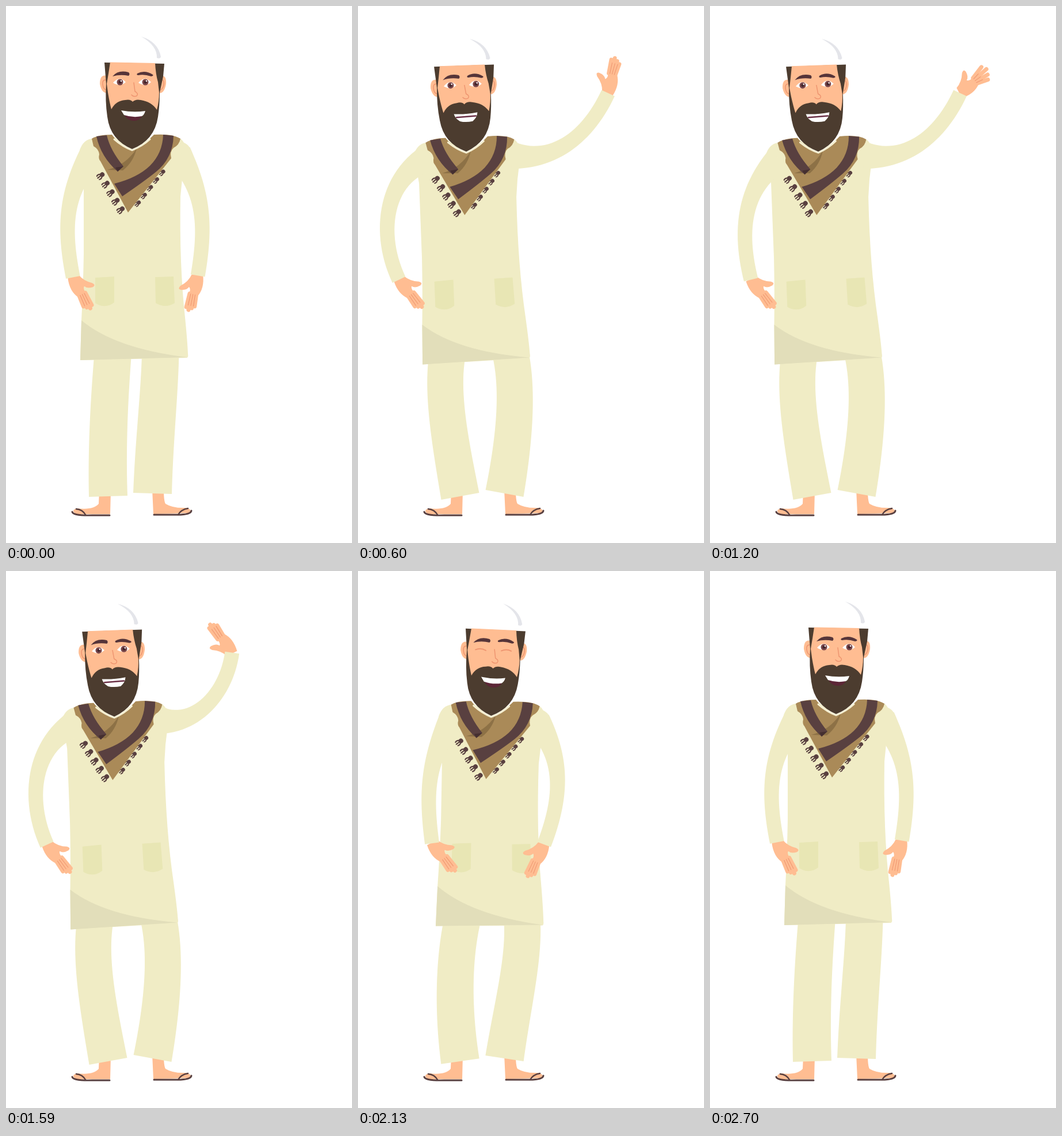
An HTML page with a canvas for the animation above (3000 ms loop, 601 by 931 pixels).

```html
<!DOCTYPE html>
<html lang="en">
<head>
<meta charset="utf-8">
<title>Waving man</title>
<style>
html, body { margin: 0; width: 100%; height: 100%; overflow: hidden; background: #fff; }
canvas { display: block; }
</style>
</head>
<body>
<canvas id="stage" width="601" height="931"></canvas>
<script>
const ctx = document.getElementById('stage').getContext('2d');
const CLOTH = '#f0ecc5', SKIN = '#ffbd92', CREASE = '#ee9570', HAIR = '#4c3c2f',
      BROWN = '#aa8a58', DARK = '#594040', BROW = '#563539';
ctx.lineCap = 'round';

const rad = deg => deg * Math.PI / 180;
const ease = (t, from, to) => {
  const u = Math.max(0, Math.min(1, (t - from) / (to - from)));
  return u * u * (3 - 2 * u);
};
const bump = (t, center, reach) =>
  (1 + Math.cos(Math.PI * Math.min(1, Math.abs(t - center) / reach))) / 2;
const swing = (t, peak) => Math.cos((t - peak) / 780 * 2 * Math.PI);

function fill(d, color) { ctx.fillStyle = color; ctx.fill(new Path2D(d)); }
function line(d, color, width) {
  ctx.strokeStyle = color; ctx.lineWidth = width; ctx.stroke(new Path2D(d));
}
function disc(x, y, r, color) {
  ctx.fillStyle = color; ctx.beginPath(); ctx.arc(x, y, r, 0, 7); ctx.fill();
}
function at(x, y, angle, paint, flip = 1) {
  ctx.save(); ctx.translate(x, y); ctx.rotate(rad(angle)); ctx.scale(flip, 1);
  paint(); ctx.restore();
}

// Tapered tube along a cubic curve
function limb(p, width) {
  const near = [], far = [], steps = 28;
  for (let i = 0; i <= steps; i++) {
    const t = i / steps, s = 1 - t;
    const pos = n => s*s*s*p[0][n] + 3*s*s*t*p[1][n] + 3*s*t*t*p[2][n] + t*t*t*p[3][n];
    const dir = n => s*s*(p[1][n]-p[0][n]) + 2*s*t*(p[2][n]-p[1][n]) + t*t*(p[3][n]-p[2][n]);
    const x = pos(0), y = pos(1), dx = dir(0), dy = dir(1), k = width(t) / 2 / Math.hypot(dx, dy);
    near.push([x - dy * k, y + dx * k]);
    far.unshift([x + dy * k, y - dx * k]);
  }
  fill('M' + near.concat(far).join('L') + 'Z', CLOTH);
}

function leg(hip, ankle, out) {
  const dy = ankle[1] - hip[1], bend = Math.abs(out);
  limb([hip, [hip[0] + out * 1.19, hip[1] + dy * .24],
    [ankle[0] + out * .7, hip[1] + dy * .61], ankle],
    t => 64 + 3 * t - bend * .09 * Math.sin(Math.PI * t));
}

// angle points from shoulder to wrist, bow curves the arm; side -1 mirrors it
function arm(shoulder, side, angle, length, bow, paintHand) {
  const step = (from, deg, dist) =>
    [from[0] + side * Math.cos(rad(deg)) * dist, from[1] + Math.sin(rad(deg)) * dist];
  const wrist = step(shoulder, angle, length);
  const elbow = step(wrist, angle + bow * .75, -length * .4);
  paintHand(...wrist);
  disc(...shoulder, 23, CLOTH);
  limb([shoulder, step(shoulder, angle - bow, length * .38), elbow, wrist],
    t => 25 + 22 * (1 - t) ** 4);
}

function hand(spread) {
  const finger = (i, length, color, width) => {
    const a = rad(67 - i * (2 + 9 * spread));
    line(`M${15 + i * 3.6} ${30 - i * 1.6}l${Math.cos(a) * length} ${Math.sin(a) * length}`, color, width);
  };
  fill('M-9 1L10 -4Q18 7 33 11Q40 15 34 18Q24 21 19 16Q16 20 22 29L16 37L8 35Q-7 24 -9 1Z', SKIN);
  for (let i = -1.5; i < 2; i++) finger(i, 28 - 4 * Math.abs(i - .5), SKIN, 7);
  for (let i = -1; i < 2; i++) finger(i, 20 - 8 * spread, CREASE, 1);
}
function fist() {
  fill('M-8 0L12 0Q28 6 27 22Q24 34 12 36Q-2 37 -5 28Q-7 14 -8 0Z', SKIN);
  line('M4 34Q4 28 7 24M12 35Q12 29 15 24M20 32Q18 27 21 22', CREASE, 1);
}
// Streaks left by the fast rising hand
function swish() {
  fill('M1 -9L-24 -6L1 -3ZM1 -2L-24 1L1 3ZM1 4L-24 7L1 10Z', '#fff');
  ctx.lineCap = 'butt';
  ctx.setLineDash([5, 4, 7, 3, 10, 2]);
  line('M76 -33Q83 -8 75 24', '#f8d9b0', 8);
  ctx.setLineDash([]);
  ctx.lineCap = 'round';
}

function feet() {
  fill('M162 840L182 840L181 881L122 881Q111 874 124 871Q152 874 161 863Z', SKIN);
  fill('M254 838L274 838Q274 858 277 863Q290 871 312 870Q326 873 317 879L256 881Z', SKIN);
  line('M115 877Q117 884 150 883L180 883M257 882L298 882Q321 882 322 875', DARK, 3);
  line('M122 872Q133 873 138 882M299 882Q304 873 316 871', DARK, 2.5);
}

function torso() {
  fill('M149 230Q134 232 128 250L135 300L135 430Q134 490 131 545L129 614L314 610Q317 609 316 603Q315 580 311 540Q301 450 303 330L306 300L313 256Q312 236 303 230L257 224L219 252L184 224Z', CLOTH);
  fill('M131 545Q190 594 315 609L129 614Z', '#e2deba');
  fill('M155 471L188 469L188 514Q172 526 155 515Z', '#e8e6b4');
  fill('M259 470L291 469L293 515Q277 525 260 515Z', '#e8e6b4');
}

function tassel(x, y, size) {
  at(x, y, -38, () => {
    ctx.scale(size, size);
    disc(3, 0, 4.5, DARK);
    line('M1 -2Q-3 -6 -7 -4M1 0L-8 0M1 2Q-3 6 -7 4', DARK, 2.4);
  });
}

function scarf(blur) {
  ctx.filter = blur;
  for (let i = 0; i < 5; i++) {
    tassel(165 + i * 8.7, 294 + i * 14.8, .9);
    tassel(229 + i * 10.6, 342 - i * 13.4, .75);
  }
  ctx.filter = 'none';
  fill('M149 230Q160 223 184 223L190 231Q203 244 219 250Q237 243 249 231L257 223Q290 221 303 230Q301 241 291 246Q284 252 287 264L212 358L164 269Q160 265 162 257Q161 248 152 243Z', BROWN);
  ctx.filter = blur;
  fill('M227 247Q208 276 176 284L203 285Q221 271 227 247Z', '#8d7146');
  fill('M157 226L175 224Q181 250 204 278L194 287Q165 262 157 226Z', DARK);
  fill('M190 280L204 278L194 287Z', '#452f30');
  fill('M273 223L291 225Q290 264 260 288Q240 304 202 330L188 308Q228 298 250 277Q272 255 273 223Z', DARK);
  ctx.filter = 'none';
  line('M188 231Q203 244 219 250Q237 243 250 231', '#f5efd2', 3);
}

function head(blink, grin, blur) {
  fill('M175 121Q163 118 163 135Q166 152 177 151ZM270 121Q279 120 278 135Q275 152 266 151Z', SKIN);
  line('M173 128Q167 128 168 136Q169 144 173 145M272 128Q275 130 274 137Q272 144 269 145', CREASE, 1.5);
  fill('M171 98L275 100L273 122L267 150Q267 172 264 192Q258 233 219 248Q181 232 176 192Q172 165 174 135Z', HAIR);
  fill('M181 97.5Q178 118 175 135L177 150Q180 168 183 179Q191 164 207 163Q216 161 220 166Q225 161 234 163Q253 166 262 180Q266 165 266 150L264 132Q260 118 259 99Z', SKIN);
  ctx.filter = blur;
  fill('M235 53Q264 62 269 88Q268 92 262 90Q263 69 235 53Z', '#e4e5ea');
  fill('M185 122Q195 110 213 115Q216 118 213 121Q198 118 185 122Z', BROW);
  fill('M228 117Q241 110 255 119Q257 121 252 122Q240 118 230 120Q226 120 228 117Z', BROW);
  line('M222 133L224 148Q231 152 227 156Q221 158 218 154', CREASE, 1.5);
  if (blink) {
    line('M189 134Q198 130 207 135M234 135Q243 131 251 135', CREASE, 2);
  } else {
    for (const x of [197, 241]) {
      fill(`M${x - 11} 133Q${x} 120 ${x + 11} 132Q${x + 1} 141 ${x - 11} 133Z`, '#fff');
      disc(x + 1, 132, 5.5, '#7a474a');
      disc(x + 1, 132, 2.5, '#40242b');
      disc(x + 3, 130, 1.3, '#fff');
    }
  }
  if (grin) {
    fill('M201 182Q222 184 242 181Q241 190 233 196Q221 198 211 195Q203 190 201 182Z', '#fff');
    line('M205 188L239 187', '#6b3046', 2.5);
  } else {
    fill('M206 189L237 189Q233 199 221 199Q210 198 206 189Z', '#5c2636');
    fill('M200 181Q221 185 242 182Q240 189 236 191Q220 194 205 189Z', '#fff');
  }
  ctx.filter = 'none';
}

function draw(t) {
  const crouch = bump(t, 180, 180), rebound = bump(t, 400, 120), sway = bump(t, 2130, 570);
  const raise = ease(t, 90, 320) - ease(t, 1650, 2130);
  const lift = ease(t, 150, 400) - ease(t, 1620, 2100);
  const handWave = swing(t, 1200) * raise, armWave = swing(t, 1290) * raise;
  const low = crouch > .3, rushing = t > 180 && t < 300;
  const blur = rushing ? 'blur(2px)' : 'none';

  const x = 222 - 17 * lift + 6 * sway, y = 612 + 52 * crouch - 12 * rebound + 4 * lift + 3 * sway;
  const lean = sway - 2.2 * lift, bend = 5 + 116 * crouch - 25 * rebound + 25 * lift + 19 * sway;
  const cos = Math.cos(rad(lean)), sin = Math.sin(rad(lean));
  const place = (px, py) => [x + (px - 222) * cos - (py - 612) * sin,
                             y + (px - 222) * sin + (py - 612) * cos];
  const onBody = paint => at(x, y, lean, () => { ctx.translate(-222, -612); paint(); });

  ctx.fillStyle = '#fff';
  ctx.fillRect(0, 0, 601, 931);
  feet();
  leg(place(190, 550), [177.5, 850], -bend);
  leg(place(267, 550), [254.5, 845], bend);
  onBody(torso);

  const leftBow = 27 + 16 * lift - 7 * handWave + 12 * bump(t, 520, 250) - 32 * crouch - 5 * sway;
  arm(place(150, 258), -1, 81 - 4 * lift, 215, leftBow, (wx, wy) =>
    at(wx, wy, -2 - 11 * Math.max(lift, sway), low ? fist : () => hand(0)));

  const angle = 81 - 119.5 * raise + 7 * armWave + 6 * sway;
  const bow = 25 - 72 * lift + 6 * armWave + 7 * sway;
  let tip;
  arm(place(300, 258), 1, angle, 212 - 28 * raise + 18 * armWave, bow, (wx, wy) => {
    tip = [wx, wy];
    if (!rushing) at(wx, wy, -12 - 135 * raise + 44 * handWave + 12 * sway,
      () => hand(Math.max(0, handWave)), raise > .5 ? 1 : -1);
  });
  if (rushing) at(...tip, angle + bow * .75, swish);

  onBody(() => {
    scarf(blur);
    at(219, 245, lean * .4, () => {
      ctx.translate(-219, -245);
      head(low || sway > .93, lift > .25, blur);
    });
  });
}

function tick() {
  const t = performance.now() % 3000;
  draw(Math.min(2700, Math.floor(t / 30) * 30));
  requestAnimationFrame(tick);
}
tick();
</script>
</body>
</html>
```
